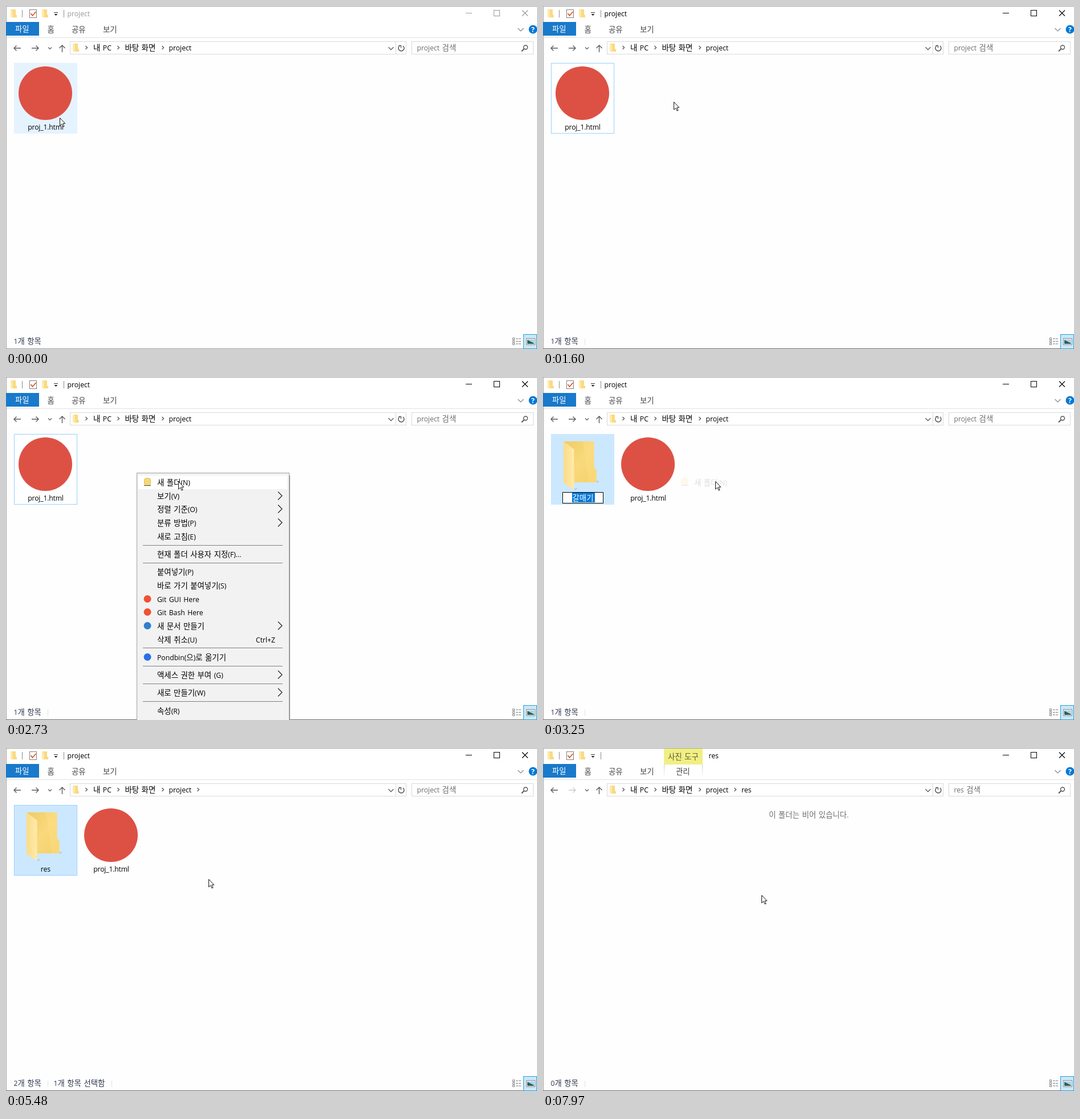
These frames come from a looping animation (931x602 px, 8 s). An HTML page:

```html
<!DOCTYPE html>
<html lang="ko">
<head>
<meta charset="utf-8">
<title>project</title>
<style>
html, body { margin: 0; width: 100%; height: 100%; overflow: hidden; background: #fff; }
svg { display: block; width: 100%; height: 100%; }
text { font: 12.2px "Open Sans", "Noto Sans", "Noto Sans CJK KR", sans-serif; word-spacing: 1.3px; white-space: pre; }
.ko { font-family: "Noto Sans CJK KR", "Noto Sans CJK JP", "Noto Sans CJK", sans-serif; font-size: 13.4px; font-weight: 350; }
.mid { text-anchor: middle; }
.label { text-anchor: middle; letter-spacing: -.2px; }
</style>
</head>
<body>
<svg id="stage" viewBox="0 0 931 602" xmlns="http://www.w3.org/2000/svg">
  <defs>
    <linearGradient id="flap"><stop stop-color="#fbdc86"/><stop offset="1" stop-color="#ffeaac"/></linearGradient>
    <linearGradient id="back" x2="1" y2="1"><stop stop-color="#f1cb66"/><stop offset=".5" stop-color="#f8d97c"/><stop offset="1" stop-color="#f5d06c"/></linearGradient>
    <linearGradient id="edge" x2="0" y2="1"><stop stop-color="#c8c8c8"/><stop offset="1" stop-color="#f4f4f4"/></linearGradient>
  </defs>
  <g id="chrome"></g>
  <g id="view"></g>
</svg>
<script>
const LOOP = 8000;
const $ = id => document.getElementById(id);

const text = (x, y, s, fill = '#000', cls = '') =>
  `<text x="${x}" y="${y}" fill="${fill}" class="${cls}">${s.replace(/[가-힣]+/g, k => `<tspan class="ko">${k}</tspan>`)}</text>`;
const rect = (x, y, w, h, fill, stroke = 'none') =>
  `<rect x="${x}" y="${y}" width="${w}" height="${h}" fill="${fill}" stroke="${stroke}"/>`;
const line = (d, stroke, w = 1) => `<path d="${d}" fill="none" stroke="${stroke}" stroke-width="${w}"/>`;
const fill = (d, color) => `<path d="${d}" fill="${color}"/>`;
const dot = (x, y, r, color) => `<circle cx="${x}" cy="${y}" r="${r}" fill="${color}"/>`;
const chevron = (x, y, s, color, w = 1.3) => line(`M${x - s / 2} ${y - s}l${s} ${s}l${-s} ${s}`, color, w);
const chevronDown = (x, y, s, color, w = 1.3) => line(`M${x - s} ${y - s / 2}l${s} ${s}l${s} ${-s}`, color, w);

const smallFolder = (x, y) =>
  fill(`M${x + 1} ${y}h8v9l2 1v4h-7z`, '#f9da82') + fill(`M${x} ${y}l4 2v13l-4-2z`, '#ffe9a8');

const bigFolder =
  fill('M54 196l7-1l-5 4z M94 182l5 1l-5 3z', '#b5cbdc') +
  fill('M37 113H89.500V159L93.500 162V185H54z', 'url(#back)') +
  fill('M70 113H89.500V159L93.500 162V185H80z', '#ffe08855') +
  fill('M36 113L54.500 127V198L36 186z', 'url(#flap)');

const arrowLeft = (x, y, color) => line(`M${x + 13} ${y}h-12m4.500-4.500l-4.500 4.500l4.500 4.500`, color, 1.4);

function staticParts() {
  let s = rect(0, 0, 931, 602, '#fefefe') + rect(1, 1, 930, 88, '#fff');
  // quick access bar
  s += smallFolder(8, 6) + smallFolder(63, 6);
  s += line('M28.500 7v13M101.500 7v13', '#8c8c8c');
  s += rect(41.5, 6.5, 12, 14, '#fff', '#808080') + line('M43.500 13l3 4l6-7', '#d9541e', 1.7);
  s += line('M84 11.500h7', '#333') + fill('M84.500 14h6l-3 3z', '#222');
  // ribbon
  s += text(72.5, 45.5, '홈', '#444') + text(115, 45.5, '공유', '#444') + text(170, 45.5, '보기', '#444');
  s += line('M1 55.500H931', '#e3e3e3') + chevronDown(902.5, 41.5, 5, '#8a8a8a', 1.2);
  s += dot(924, 41, 7.5, '#0078d7') + '<text x="924" y="45.500" class="mid" fill="#fff" style="font-weight:700">?</text>';
  // address row
  s += arrowLeft(13, 74, '#5c5c5c') + chevronDown(77, 74, 3, '#666');
  s += line('M98.500 81v-12m-5 5l5-5l5 5', '#5c5c5c', 1.4);
  s += rect(112.5, 62.5, 589, 22, '#fff', '#d9d9d9') + line('M683.500 63v21', '#d9d9d9');
  s += smallFolder(117, 66) + chevronDown(675, 74.5, 4.5, '#666', 1.5);
  s += line('M690 70a5 5 0 1 0 6 0', '#555', 1.5) + line('M688.500 69.500h4v4', '#555', 1.3);
  s += rect(711.5, 62.5, 213, 22, '#fff', '#d9d9d9');
  s += '<circle cx="911" cy="72.500" r="3.500" fill="none" stroke="#555" stroke-width="1.400"/>' + line('M908.500 75l-4.500 4.500', '#555', 1.8);
  [141, 197, 275].forEach(x => s += chevron(x, 73, 3, '#555'));
  s += text(153, 77.5, '내 PC') + text(208.5, 77.5, '바탕 화면') + text(285.5, 77.5, 'project');
  // view buttons
  for (let i = 0; i < 3; i++) {
    const y = 582.5 + i * 4.5;
    s += rect(888.5, y, 3, 3, '#fff', '#8b8b8b') + line(`M894 ${y + 1.5}h4m1 0h4`, '#777');
  }
  return s;
}

const pictureButton = rect(907.5, 576.5, 23, 25, '#cbe8f6', '#26a0da') +
  rect(912.5, 583.5, 15, 11, '#fff', '#8b8b8b') + rect(914, 585, 12, 8, '#a9d3ee') +
  fill('M914 586l6 3l6 3v1h-12z', '#2f5e58');

function tile(x, state) {
  const look = {
    hover: ['#e5f3ff', '#e5f3ff'], selected: ['#cce8ff', '#99d1ff'],
    focus: ['#fff', '#99d1ff'], edit: ['#cce8ff', '#cce8ff']
  }[state];
  return look ? rect(x + .5, 100.5, 110, 123, ...look) : '';
}

const page = (x, state) => tile(x, state) + dot(x + 55, 153, 47, '#dd5144') +
  text(x + 55.5, 217, 'proj_1.html', '#000', 'label');

function renameBox(t) {
  const all = t < 4230;
  const name = all ? '갈매기' : 'res'.slice(0, t < 4480 ? 1 : t < 4730 ? 2 : 3);
  const [half, caret] = all ? [35.5, 0] : [[18.5, 72], [22, 75], [24.5, 78]][name.length - 1];
  return rect(70 - half, 202.5, half * 2, 19, '#fff', '#000') +
    (all ? rect(51, 203, 40, 17, '#0078d7') : '') +
    text(70, 216.5, name, all ? '#fff' : '#000', 'mid') +
    (caret && t < 5230 ? line(`M${caret + .5} 203v17`, '#000') : '');
}

// [label, y centre, has submenu, icon colour]
const menuItems = [
  ['새 폴더(N)', 185], ['보기(V)', 209, 1], ['정렬 기준(O)', 232, 1], ['분류 방법(P)', 256, 1], ['새로 고침(E)', 280],
  ['현재 폴더 사용자 지정(F)...', 311], ['붙여넣기(P)', 342], ['바로 가기 붙여넣기(S)', 366],
  ['Git GUI Here', 390, 0, '#f05133'], ['Git Bash Here', 413, 0, '#f05133'],
  ['새 문서 만들기', 437, 1, '#2f7fd0'], ['삭제 취소(U)', 461],
  ['Pondbin(으)로 옮기기', 492, 0, '#2a6fe8'], ['액세스 권한 부여 (G)', 523, 1],
  ['새로 만들기(W)', 554, 1], ['속성(R)', 586]
];

const menuItem = ([label, y, sub, icon]) => text(265, y + 4.5, label) +
  (sub ? chevron(480.5, y - .5, 7, '#222', 1.2) : '') + (icon ? dot(248, y - .5, 6.5, icon) : '');

const newFolderIcon = '<rect x="242.500" y="177.500" width="11" height="13" rx="4" fill="#f6d873" stroke="#d8b860"/>' +
  line('M242 190.500h12', '#554a30');

function menu(opacity, hot) {
  let s = rect(229.5, 168.5, 267, 450, '#f2f2f2', '#a0a0a0');
  if (hot) s += rect(232, 173, 261, 24, '#fff');
  [295, 326, 475, 507, 538, 569].forEach(y => s += line(`M240 ${y + .5}H485`, '#808080'));
  s += menuItems.map(menuItem).join('') + newFolderIcon + text(438, 465.5, 'Ctrl+Z');
  return rect(496, 173, 2, 429, '#8e8e8e') + `<g opacity="${opacity}">${s}</g>`;
}

const chosenItem = opacity =>
  `<g opacity="${opacity}">${rect(232, 173, 261, 24, '#fff')}${newFolderIcon}${menuItem(menuItems[0])}</g>`;

// pointer positions, held until the next: [ms, x, y]
const pointerPath = [
  [0, 94, 196], [120, 78, 170], [620, 108, 169], [740, 155, 168], [890, 229, 168],
  [2490, 250, 173], [2610, 288, 181], [2730, 302, 183],
  [3370, 318, 199], [3490, 341, 220], [3610, 352, 229], [3730, 355, 230],
  [6220, 318, 247], [6340, 190, 226], [6460, 88, 190], [6580, 44, 168], [6700, 55, 163],
  [7200, 130, 184], [7320, 258, 221], [7470, 383, 255], [7850, 383, 257], [7970, 383, 258]
];

function pointer(t) {
  const [, x, y] = pointerPath.filter(p => p[0] <= t).pop();
  return `<path transform="translate(${x + .5} ${y + .5})" d="M0 0V13.500L3.200 10.500L5.500 15.500L7.500 14.700L5.300 9.700H9.300z" fill="#fff" stroke="#111" stroke-linejoin="round"/>`;
}

function windowFrame(t) {
  const active = t >= 500, opened = t >= 7200, tools = t >= 5600;
  const ink = active ? '#000' : '#999', name = opened ? 'res' : 'project';
  let s = line('M0 .5H931M.5 0V602', '#a4a4a4') + line('M0 601.500H931', active ? '#666' : '#999') + pictureButton;
  s += rect(0, 28, 58, 24, '#1979ca') + text(16, 45, '파일', '#fff');
  s += line('M806 12.500h11', ink) + rect(855.5, 7.5, 10, 10, 'none', ink) + line('M905 7.500l10 10M915 7.500l-10 10', ink, 1.1);
  if (tools) {
    s += rect(212, 1, 68, 28, '#f1ef83') + text(219, 19.5, '사진 도구', '#5c5c3c');
    s += rect(212, 29, 1, 20, 'url(#edge)') + rect(279, 29, 1, 20, 'url(#edge)') + text(233, 45.5, '관리', '#444');
  }
  s += text(tools ? 290.5 : 107.5, 17.5, name, ink);
  s += `<g transform="rotate(180 51.500 74)">${arrowLeft(45, 74, opened ? '#ccc' : '#5c5c5c')}</g>`;
  if (t >= 3490) s += chevron(337, 73, 3, '#555');
  if (opened) s += text(348, 77.5, 'res');
  return s + text(720.5, 78, name + ' 검색', '#6d6d6d');
}

function statusBar(t) {
  const count = t < 3490 ? 1 : t < 7200 ? 2 : 0, ink = '#2f3650';
  const picked = t >= 500 && t < 1600 ? '1개 항목 선택함 5.19KB' : count === 2 ? '1개 항목 선택함' : '';
  return text(13.5, 593, count + '개 항목', ink) + text(83.5, 593, picked, ink) +
    (t >= 1600 ? line('M73.500 584v11', '#e2e2e2') : '') +
    (count === 2 ? line('M185.500 584v11', '#e2e2e2') : '');
}

function content(t) {
  if (t >= 7200) return t < 7320 ? '' : text(396, 122, '이 폴더는 비어 있습니다.', '#6d6d6d');
  if (t < 3250) return page(14, t < 500 ? 'hover' : t < 1600 ? 'selected' : 'focus');
  const editing = t < 5480;
  return tile(14, editing ? 'edit' : 'selected') + bigFolder +
    (editing ? renameBox(t) : text(69.5, 217, 'res', '#000', 'mid')) + page(129);
}

function popup(t) {
  if (t < 2250 || t >= 3370) return '';
  if (t < 3100) return menu(t < 2370 ? .25 : 1, t >= 2490);
  return chosenItem(t < 3250 ? .7 : .12);
}

let shown = '';
function render(t) {
  const s = windowFrame(t) + statusBar(t) + content(t) + popup(t) + pointer(t);
  if (s !== shown) $('view').innerHTML = shown = s;
}

$('chrome').innerHTML = staticParts();
const start = performance.now();
function tick() {
  render((performance.now() - start) % LOOP);
  requestAnimationFrame(tick);
}
tick();
</script>
</body>
</html>
```
